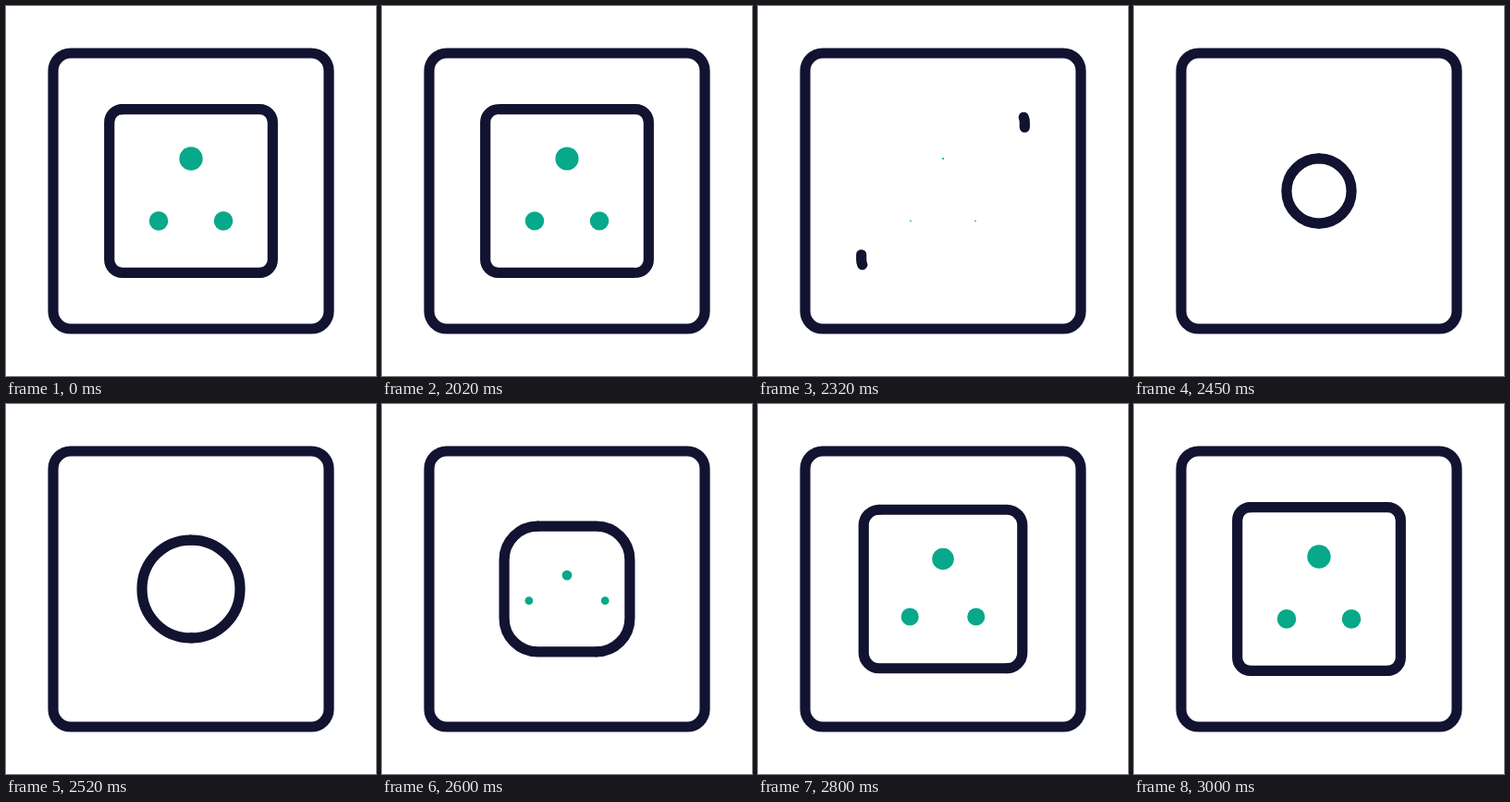
An HTML page that plays this animation: 400x400 px, repeating every 3.02 s.

```html
<!DOCTYPE html>
<html lang="en">
<head>
<meta charset="utf-8">
<title>Socket</title>
<style>
  html, body { margin: 0; width: 100%; height: 100%; overflow: hidden; background: #fff; }
  svg { display: block; width: 100%; height: 100%; }
</style>
</head>
<body>
<svg viewBox="-200 -200 400 400">
  <g fill="none" stroke="#121331" stroke-width="11.2" stroke-linecap="round" stroke-linejoin="round">
    <rect x="-149" y="-149" width="298" height="298" rx="19"/>
    <g id="frame">
      <path id="half" pathLength="1"/>
      <use href="#half" transform="rotate(180)"/>
    </g>
  </g>
  <g fill="#08a88a">
    <circle class="hole"/>
    <circle class="hole"/>
    <circle class="hole"/>
  </g>
</svg>
<script>
const LOOP = 3020, SIZE = 88.3, CORNER = 14;
const frame = document.getElementById('frame');
const half = document.getElementById('half');
const circles = document.querySelectorAll('.hole');
const holes = [
  { from: [0, 0], to: [0, -35], r: 12.7 },
  { from: [-45.7, -2], to: [-35, 32.4], r: 10.3 },
  { from: [45.7, -2], to: [35, 32.4], r: 10.3 }
];

const mix = (a, b, p) => a + (b - a) * p;
const progress = (t, start, end) => Math.min(1, Math.max(0, (t - start) / (end - start)));
const easeInOut = p => p * p * (3 - 2 * p);
const easeOut = p => 1 - (1 - p) ** 3;

// Half of a rounded square, from the top left to the bottom right corner
function drawFrame(size, corner, visible) {
  const s = size, c = s - corner, arc = `A${corner} ${corner} 0 0 1`;
  half.setAttribute('d', `M${-c} ${-s}H${c}${arc} ${s} ${-c}V${c}${arc} ${c} ${s}`);
  half.setAttribute('stroke-dasharray', visible < 1 ? `${visible} 2` : 'none');
  half.setAttribute('stroke-dashoffset', (visible - 1) / 2);
  frame.style.display = visible > 0 && size > 0 ? '' : 'none';
}

function drawHoles(scale, spread) {
  holes.forEach(({ from, to, r }, i) => {
    circles[i].setAttribute('cx', mix(from[0], to[0], spread));
    circles[i].setAttribute('cy', mix(from[1], to[1], spread));
    circles[i].setAttribute('r', r * scale);
  });
}

function render(t) {
  if (t < 2020) {
    drawFrame(SIZE, CORNER, 1);
    drawHoles(1, 1);
  } else if (t < 2360) {
    drawFrame(SIZE, CORNER, 1 - easeInOut(progress(t, 2000, 2360)));
    drawHoles(1 - easeInOut(progress(t, 2000, 2390)), 1);
  } else {
    // A circle grows, then squares off while the holes open
    const size = SIZE * easeOut(progress(t, 2350, 3000));
    const open = easeOut(progress(t, 2520, 3000));
    drawFrame(size, Math.min(size, mix(52.7, CORNER, open)), 1);
    drawHoles(open, open);
  }
}

function tick() {
  render(performance.now() % LOOP);
  requestAnimationFrame(tick);
}
tick();
</script>
</body>
</html>
```
